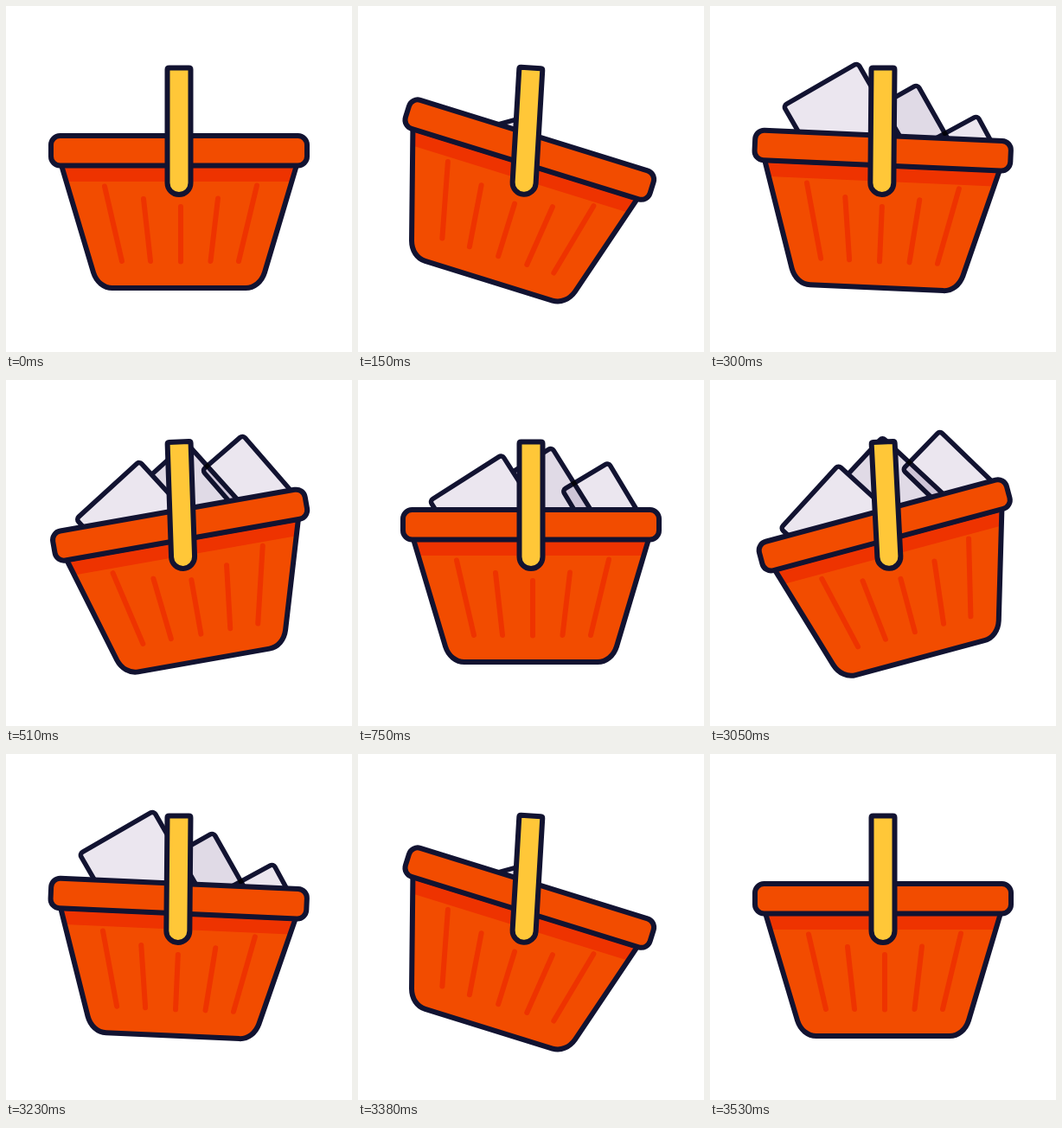
These frames come from a looping animation (400x400 px, 4560 ms). An HTML page:

```html
<!DOCTYPE html>
<html lang="en">
<head>
<meta charset="utf-8">
<title>Basket</title>
<style>
  html, body { margin: 0; width: 100%; height: 100%; overflow: hidden; background: #fff; }
  svg { display: block; width: 100%; height: 100%; }
  .ink { stroke: #121331; stroke-width: 6; stroke-linejoin: round; }
  .paper { fill: #ebe6ef; stroke-width: 5.5; }
  .shade { fill: #e0dae6; mix-blend-mode: multiply; }
</style>
</head>
<body>
<svg viewBox="0 0 400 400">
  <defs>
    <clipPath id="opening"><rect x="-100" y="-100" width="600" height="267"/></clipPath>
  </defs>
  <g id="basket">
    <g clip-path="url(#opening)">
      <rect id="right" class="ink paper" x="-62" width="62" height="100" rx="4"/>
      <rect id="middle" class="ink paper shade" x="-99" width="99" height="125" rx="4"/>
      <rect id="left" class="ink paper" x="-99" width="99" height="125" rx="4"/>
    </g>
    <path id="body" fill="#f24c00" d="M64 184L101 308C104.500 319 113 326 123 326H277C287 326 295.500 319 299 308L336 184Z"/>
    <path fill="#ee3300" d="M64 184H336L330.300 203H69.700Z"/>
    <path fill="none" stroke="#ee3300" stroke-width="6" stroke-linecap="round"
      d="M114 208.500L134 295M159 223L167 295M202 232V295.500M245 222.500L236.500 295M290 207.500L269 295"/>
    <use href="#body" class="ink" style="fill-opacity:0"/>
    <rect class="ink" fill="#f24c00" x="52" y="150" width="296" height="34.500" rx="10.500"/>
  </g>
  <path id="handle" class="ink" stroke-width="5.500" fill="#ffc738"
    d="M188.500 71.500H211.500Q213.500 71.500 213.500 73.500V204.500A13.500 13.500 0 0 1 186.500 204.500V73.500Q186.500 71.500 188.500 71.500Z"/>
</svg>
<script>
const LOOP = 4560, STEP = 30, FILLED = 750, EMPTY_AT = 3530;
const el = id => document.getElementById(id);

// [time, value] keys for the swing of the basket, in degrees
const swing = [[0, 0], [198, 20], [420, -20], [600, 0]];

// Resting top-right corner, tilt, and keys for the offset from rest
const papers = [
  { id: 'left', x: 166.5, y: 86.5, tilt: -32.5,
    dx: [[30, 40], [305, 0]], dy: [[30, 85], [300, -19], [480, 0]] },
  { id: 'middle', x: 224, y: 78, tilt: -32,
    dx: [[90, 43], [420, 0]], dy: [[90, 85], [420, -19], [540, 0]] },
  { id: 'right', x: 289.5, y: 95.5, tilt: -31,
    dx: [[120, 32], [510, 0]], dy: [[120, 62], [510, -18], [750, 0]] }
];

const ease = s => (1 - Math.cos(Math.PI * s)) / 2;

function sample(keys, t) {
  if (t <= keys[0][0]) return keys[0][1];
  for (let i = 1; i < keys.length; i++) {
    const [t0, v0] = keys[i - 1], [t1, v1] = keys[i];
    if (t < t1) return v0 + (v1 - v0) * ease((t - t0) / (t1 - t0));
  }
  return keys[keys.length - 1][1];
}

// Fill, hold, then run the same motion backwards
function progress(t) {
  const out = Math.ceil((EMPTY_AT - t) / STEP) * STEP;
  const into = Math.floor(t / STEP) * STEP;
  return Math.max(0, Math.min(into, out, FILLED));
}

function draw(t) {
  const p = progress(t);
  const angle = sample(swing, p);
  el('basket').setAttribute('transform', `rotate(${angle} 203 161)`);
  el('handle').setAttribute('transform', `rotate(${angle * 0.195} 200 70)`);
  for (const { id, x, y, tilt, dx, dy } of papers) {
    el(id).setAttribute('transform',
      `translate(${x + sample(dx, p)} ${y + sample(dy, p)}) rotate(${tilt})`);
  }
}

const start = performance.now();
function tick() {
  draw((performance.now() - start) % LOOP);
  requestAnimationFrame(tick);
}
tick();
</script>
</body>
</html>
```
